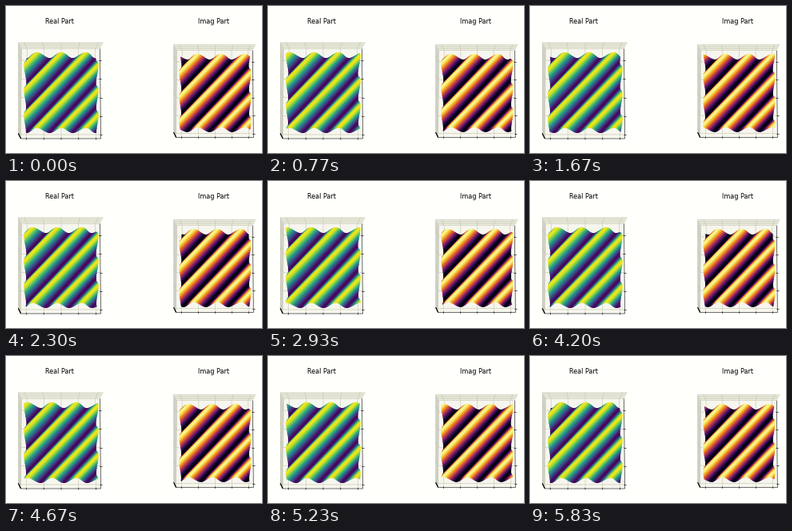
A matplotlib script that plays this animation: 320 px wide and 184 px high, repeating every 5860 ms.

```python
import numpy as np
import matplotlib.pyplot as plt
from matplotlib.animation import FuncAnimation
from matplotlib.collections import LineCollection

W, H, DPI = 320, 184, 100
FRAMES, LOOP = 176, 5860
WAVES = 3                        # waves along each side, and cycles per loop
SPAN_U, SPAN_V = (0.07, 0.94), (0.11, 0.935)

plt.rcParams["font.family"] = "DejaVu Sans"
fig = plt.figure(figsize=(W / DPI, H / DPI), dpi=DPI, facecolor="#fffffc")
ax = fig.add_axes([0, 0, 1, 1])
ax.axis("off")


def px(n):
    return n * 72 / DPI


class Panel:
    """Box seen from above, slightly tilted, with a wave surface inside."""

    def __init__(self, title, cx, top, scale, cmap, phase):
        self.cx, self.top, self.scale = cx, top, scale
        self.cmap, self.phase = cmap, phase
        self.s, self.t = np.meshgrid(np.linspace(0, 1, 46),
                                     np.linspace(0, 1, 46))
        self.mesh = None
        ax.text(cx - 1.4, 19, title, fontsize=px(8.1),
                ha="center", va="center")
        self.draw_box()

    def project(self, u, v, w):
        """Box coordinates in 0..1 (right, front, up) to pixels."""
        zoom = 1 + 0.085 * w + 0.02 * v * (1 - w)
        x = 98 * (u - 0.5) * zoom
        y = 7.5 + 112.5 * v - (7.8 - 1.2 * v) * w
        return self.cx + self.scale * x, self.top + self.scale * y

    def lines(self, paths, color, lw):
        ax.add_collection(LineCollection(
            [[self.project(*p) for p in path] for path in paths],
            colors=color, linewidths=px(lw), zorder=2))

    def pane(self, origin, a, b, color):
        o, a, b = map(np.array, (origin, a, b))
        corners = [self.project(*c) for c in (o, o + a, o + a + b, o + b)]
        ax.fill(*zip(*corners), color=color, lw=px(0.4), zorder=1)

    def draw_box(self):
        right, front, up = np.eye(3)
        back_left = np.zeros(3)
        self.pane(back_left, right, front, "#f6f6ee")
        self.pane(back_left, right, up, "#f0f0e2")
        self.pane(back_left, front, up, "#e2e2dc")

        us, vs = np.linspace(*SPAN_U, 5), np.linspace(*SPAN_V, 5) + 0.02
        grid = [[(u, 1, 0), (u, 0, 0), (u, 0, 1)] for u in us]
        grid += [[(1, v, 0), (0, v, 0), (0, v, 1)] for v in vs]
        grid += [[(0, 1, w), (0, 0, w), (1, 0, w)]
                 for w in np.linspace(0.03, 0.97, 5)]
        self.lines(grid, "#c6c6b4", 0.6)

        self.lines([[(0, 1, 0), (1, 1, 0), (1, 0, 0)]], "#333333", 0.7)
        self.lines([[(0, 1, 0), (0, 1, 1)]], "black", 1.3)
        ticks = [[(u, 0.99, 0), (u, 1.012, 0)] for u in us]
        ticks += [[(0.985, v, 0), (1.015, v, 0)] for v in vs]
        self.lines(ticks, "#222222", 0.8)

    def update(self, progress):
        turns = WAVES * (self.s + self.t + progress) - self.phase
        z = np.cos(2 * np.pi * turns)
        u = SPAN_U[0] + self.s * np.ptp(SPAN_U)
        v = SPAN_V[0] + self.t * np.ptp(SPAN_V)
        x, y = self.project(u, v, 0.5 + 0.48 * z)
        if self.mesh:
            self.mesh.remove()
        self.mesh = ax.pcolormesh(x, y, z, cmap=self.cmap, vmin=-1, vmax=1,
                                  shading="gouraud", zorder=3)


panels = [Panel("Real Part", 68.5, 46, 1, "viridis", 0.5),
          Panel("Imag Part", 261, 48.5, 0.967, "inferno", 0.75)]
ax.set_xlim(0, W)
ax.set_ylim(H, 0)
ax.autoscale(False)


def draw(i):
    progress = max(i - 1, 0) / (FRAMES - 1)
    for panel in panels:
        panel.update(progress)
    return [panel.mesh for panel in panels]


anim = FuncAnimation(fig, draw, frames=FRAMES, interval=LOOP / FRAMES,
                     repeat=True, repeat_delay=0, blit=False)
plt.show()
```
